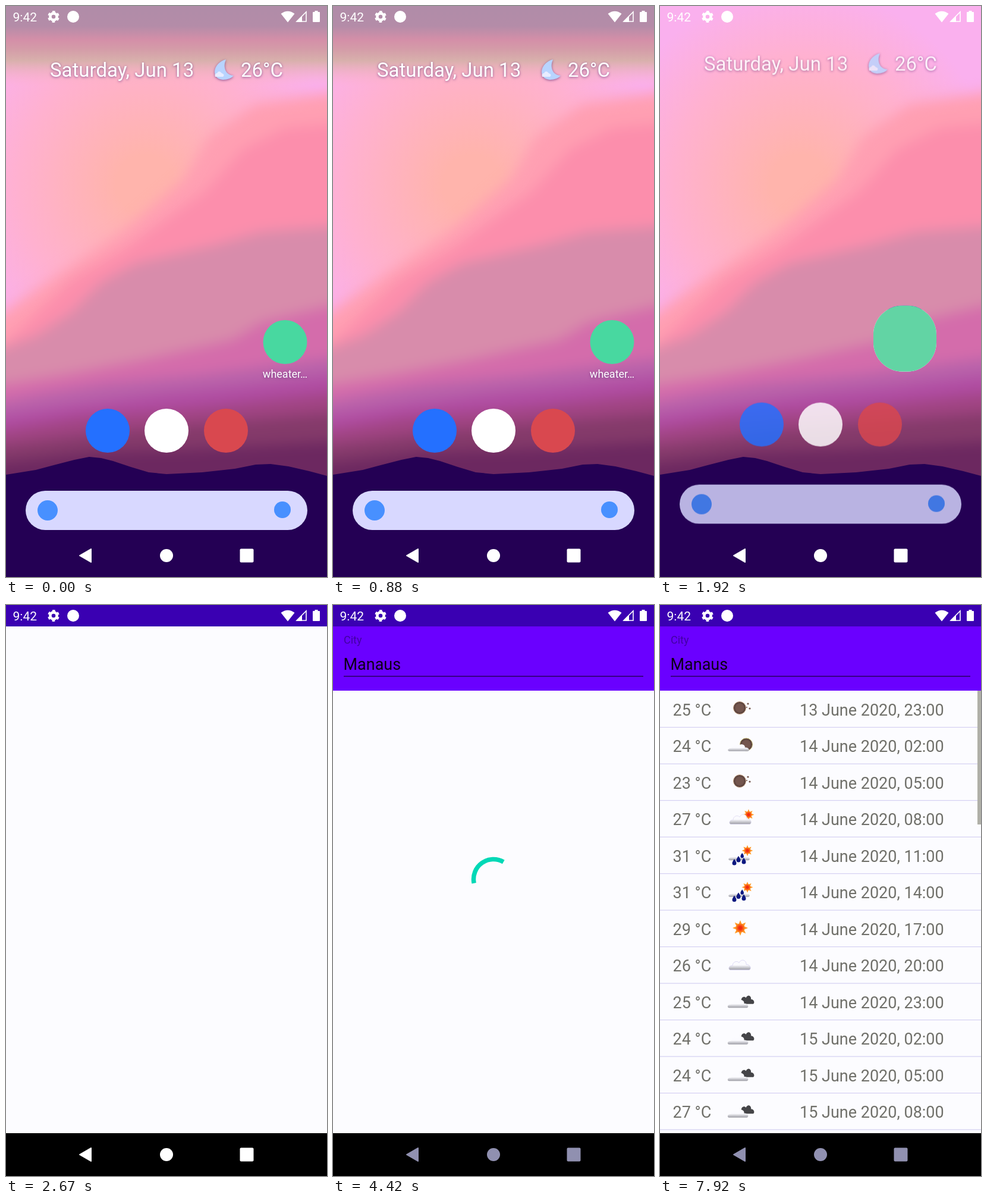
An HTML page for the animation above (8 s loop, 540 px wide and 960 px high).

```html
<!DOCTYPE html>
<html lang="en">
<head>
<meta charset="utf-8">
<title>Weather app launch</title>
<style>
html, body { margin: 0; width: 100%; height: 100%; overflow: hidden; background: #240054; }
svg { display: block; width: 100vw; height: 100vh; }
text { font-family: Roboto, sans-serif; white-space: pre; }
#bands { filter: blur(11px); }
.shadow { filter: drop-shadow(0 1px 2px rgba(110, 60, 130, .8)); }
</style>
</head>
<body>
<svg viewBox="0 0 540 960">
  <defs>
    <radialGradient id="skyFill" gradientUnits="userSpaceOnUse" cx="235" cy="300" r="330">
      <stop offset=".15" stop-color="#ffb4ac"/>
      <stop offset=".65" stop-color="#ffb1d0"/>
      <stop offset="1" stop-color="#fab0ee"/>
    </radialGradient>
    <linearGradient id="scrimFill" x1="0" y1="0" x2="0" y2="1">
      <stop offset="0" stop-color="#b08ca8"/>
      <stop offset=".25" stop-color="#b48ca8"/>
      <stop offset=".42" stop-color="#d48fa8"/>
      <stop offset=".54" stop-color="#d49ca8"/>
      <stop offset=".68" stop-color="#d8b0ac"/>
      <stop offset="1" stop-color="#ffb2c8" stop-opacity="0"/>
    </linearGradient>
    <linearGradient id="cloudFill" x1="0" y1="0" x2="0" y2="1">
      <stop offset=".5" stop-color="#fbfbff"/>
      <stop offset="1" stop-color="#9c9ca4"/>
    </linearGradient>
    <radialGradient id="sunFill">
      <stop offset=".3" stop-color="#f02a10"/>
      <stop offset="1" stop-color="#ff8a20"/>
    </radialGradient>
    <radialGradient id="moonFill">
      <stop offset=".6" stop-color="#74564e"/>
      <stop offset="1" stop-color="#4c3834"/>
    </radialGradient>
    <clipPath id="windowClip"><rect id="windowShape"/></clipPath>

    <path id="cloud" d="M-17 9C-21 8-19 1-13 2C-13-5-5-7-2-3C2-11 11-7 10 0C16-1 20 7 15 9Z"/>
    <g id="sun">
      <path id="rays" fill="#ff9a28"/>
      <circle r="7.5" fill="url(#sunFill)"/>
    </g>
    <g id="stars" fill="#74564e">
      <circle cx="13" cy="-8" r="1.6"/><circle cx="16" cy="0" r="1.6"/><circle cx="11" cy="-2" r="1"/>
    </g>
    <path id="drop" fill="#0c1880" d="M0-5C2-2 3.500 0 3.500 2A3.500 3.500 0 0 1-3.500 2C-3.500 0-2-2 0-5Z"/>

    <g id="night">
      <circle cx="-1" cy="-1" r="10.5" fill="url(#moonFill)" stroke="#c8a488"/>
      <use href="#stars"/>
    </g>
    <g id="nightCloud">
      <circle cx="10" cy="-1" r="10.5" fill="url(#moonFill)" stroke="#b8a868"/>
      <use href="#cloud" transform="translate(-2 4) scale(.98 .7)" fill="url(#cloudFill)"/>
    </g>
    <g id="sunCloud">
      <use href="#sun" transform="translate(14 -6) scale(.72)"/>
      <use href="#cloud" transform="translate(1 1)" fill="url(#cloudFill)" stroke="#d8d4f0" stroke-width=".7"/>
    </g>
    <g id="sunRain">
      <use href="#sun" transform="translate(12 -7) scale(.72)"/>
      <use href="#cloud" transform="translate(-1 3) scale(.98 .7)" fill="url(#cloudFill)"/>
      <use href="#drop" x="-10" y="12"/><use href="#drop" x="-3" y="7"/>
      <use href="#drop" x="6" y="10"/><use href="#drop" x="4" y="1" transform="scale(.8)"/>
    </g>
    <use id="clear" href="#sun"/>
    <use id="cloudy" href="#cloud" fill="url(#cloudFill)" stroke="#d0ccf0" stroke-width=".7"/>
    <g id="overcast">
      <use href="#cloud" transform="translate(11 -3) scale(.72 .85)" fill="#454548"/>
      <use href="#cloud" transform="translate(-3 4) scale(.95 .8)" fill="url(#cloudFill)"/>
    </g>
    <path id="sync" transform="scale(2.25) translate(-12 -11.8)" d="M12 6v3l4-4-4-4v3c-4.42 0-8 3.58-8 8 0 1.57.46 3.03 1.24 4.26L6.7 14.8c-.45-.83-.7-1.79-.7-2.8 0-3.31 2.69-6 6-6zm6.76 1.74L17.3 9.2c.44.84.7 1.79.7 2.8 0 3.31-2.69 6-6 6v-3l-4 4 4 4v-3c4.42 0 8-3.58 8-8 0-1.57-.46-3.03-1.24-4.26z"/>
  </defs>

  <rect width="540" height="960" fill="url(#skyFill)"/>
  <g id="bands">
    <path fill="#ff9fb2" d="M-40 540L60 470L200 375L300 290L340 220L420 165L580 140V960H-40Z"/>
    <path fill="#fc8eac" d="M-40 590L0 565L110 460L200 408L335 312L400 240L470 205L580 195V960H-40Z"/>
    <path fill="#d88cab" d="M-40 588L50 555L110 515L160 465L220 432L350 402L430 380L580 368V960H-40Z"/>
    <path fill="#d46cab" d="M-40 642L100 620L220 597L380 562L430 532L580 495V960H-40Z"/>
    <path fill="#b862aa" d="M-40 672L60 652L160 636L330 620L580 588V960H-40Z"/>
    <path fill="#b04ca2" d="M-40 694L110 672L270 652L400 640L580 618V960H-40Z"/>
    <path fill="#a04482" d="M-40 720L120 692L300 678L580 648V960H-40Z"/>
    <path fill="#843a6a" d="M-40 744L180 716L360 700L580 682V960H-40Z"/>
    <path fill="#6c2860" d="M-40 772L150 750L320 745L580 730V960H-40Z"/>
  </g>
  <path fill="#240054" d="M0 788L50 780L80 772L115 763L140 758L160 760L180 765L210 775L240 784L270 787L330 784L385 778L420 771L445 770L475 774L510 782L540 790V960H0Z"/>
  <rect id="scrim" width="540" height="135" fill="url(#scrimFill)"/>

  <g id="workspace">
    <g class="shadow" fill="#fff" font-size="33">
      <text x="74" y="119">Saturday, Jun 13</text>
      <text x="395" y="119">26°C</text>
      <path fill="#b8d4ff" d="M370 90C360 92 351 101 351 111Q352 123 365 124Q377 124 383 117C370 117 364 103 370 90Z"/>
      <path fill="#e8ecff" d="M352 119Q350 113 355 113Q358 107 363 113Q369 115 365 119Z"/>
    </g>
    <circle cx="171" cy="714" r="37" fill="#2470ff"/>
    <circle cx="270" cy="714" r="37" fill="#fff"/>
    <circle cx="370" cy="714" r="37" fill="#d9484f"/>
    <rect x="33" y="815" width="474" height="66" rx="33" fill="#d8d8ff"/>
    <circle cx="70" cy="848" r="17" fill="#4890ff"/>
    <circle cx="465" cy="847" r="14" fill="#4890ff"/>
    <g id="shortcut">
      <circle cx="469.5" cy="565" r="37" fill="#48d8a0"/>
      <text class="shadow" x="469.5" y="624.500" font-size="18" text-anchor="middle" fill="#fff">wheater…</text>
    </g>
  </g>

  <g id="window" clip-path="url(#windowClip)">
    <g id="screen">
      <rect width="540" height="960" fill="#fcfcff"/>
      <rect width="540" height="36" fill="#3a00b2"/>
      <rect y="888" width="540" height="72"/>
      <g id="header">
        <rect y="36" width="540" height="108" fill="#6a00ff"/>
        <text x="18" y="65" font-size="18" fill="#4200a4">City</text>
        <text x="17.5" y="108.5" font-size="27" fill="#0c0018">Manaus</text>
        <rect x="18" y="119" width="504" height="1.6" fill="#2a0068"/>
      </g>
      <path id="spinner" fill="none" stroke="#00d8b6" stroke-width="7.5"/>
      <g id="list">
        <g id="rows" font-size="27" fill="#70706a"></g>
        <rect id="scrollbar" x="534" y="144" width="6" height="225" fill="#b0b0a8"/>
      </g>
    </g>
    <rect id="splash" width="540" height="960" fill="#62d4a4"/>
  </g>

  <g fill="#fff">
    <text x="11.5" y="26" font-size="21">9:42</text>
    <circle cx="80" cy="18" r="5.6" fill="none" stroke="#fff" stroke-width="4.6"/>
    <circle cx="80" cy="18" r="8.4" fill="none" stroke="#fff" stroke-width="3" stroke-dasharray="4.6 4.196" stroke-dashoffset="-2.1"/>
    <circle cx="113" cy="18" r="10"/>
    <path d="M462.5 13Q474 4.5 485.500 13L474 27.500Z"/>
    <path d="M489 26L505 10V26Z" fill="none" stroke="#fff" stroke-width="1.6"/>
    <path d="M488 27L498 17V27Z"/>
    <path d="M519.500 8H524.500V10H527Q528 10 528 11V26Q528 27 527 27H517Q516 27 516 26V11Q516 10 517 10H519.500Z"/>
  </g>
  <g id="nav">
    <path d="M124 924L143 913V935Z" stroke="currentColor" stroke-width="2" stroke-linejoin="round" fill="currentColor"/>
    <circle cx="270" cy="924" r="11" fill="currentColor"/>
    <rect x="393.500" y="912.500" width="23" height="23" rx="2" fill="currentColor"/>
  </g>
</svg>
<script>
const LOOP = 8000, LAUNCH = 1885, CONTENT = 2858, LIST = 4630, ICONS = 6340;
const $ = id => document.getElementById(id);
const clamp = v => Math.min(1, Math.max(0, v));
const mix = (a, b, p) => a + (b - a) * p;
const ramp = (t, start, length) => clamp((t - start) / length);
const show = (node, on) => { node.style.display = on ? '' : 'none'; };
const setAttrs = (node, attrs) => {
  for (const key in attrs) node.setAttribute(key, attrs[key]);
};

// Cubic bezier easing with control heights 0 and 1
const bezier = (x1, x2) => x => {
  let lo = 0, hi = 1;
  for (let i = 0; i < 24; i++) {
    const s = (lo + hi) / 2;
    const at = 3 * (1 - s) ** 2 * s * x1 + 3 * (1 - s) * s * s * x2 + s ** 3;
    if (at < x) lo = s; else hi = s;
  }
  return lo * lo * (3 - 2 * lo);
};
const launchEase = bezier(.2, 0), arcEase = bezier(.4, .2);

const polar = (r, degrees) => {
  const a = degrees * Math.PI / 180;
  return [r * Math.cos(a), r * Math.sin(a)];
};
$('rays').setAttribute('d', Array.from({ length: 16 }, (_, i) =>
  (i ? 'L' : 'M') + polar(i % 2 ? 7 : 13, i * 22.5 - 90)).join('') + 'Z');

const forecast = [
  [25, 'night'], [24, 'nightCloud'], [23, 'night'], [27, 'sunCloud'],
  [31, 'sunRain'], [31, 'sunRain'], [29, 'clear'], [26, 'cloudy'],
  [25, 'overcast'], [24, 'overcast'], [24, 'overcast'], [27, 'overcast']
];
$('rows').innerHTML = forecast.map(([temp, icon], i) => {
  const hours = 23 + 3 * i, y = 61.5 * i;
  const day = 13 + Math.floor(hours / 24);
  const hour = String(hours % 24).padStart(2, '0');
  return `<g transform="translate(0 ${y})">
    <text x="21.500" y="185.500">${temp} °C</text>
    <text x="235" y="185.500">${day} June 2020, ${hour}:00</text>
    <use class="waiting" href="#sync" x="135" y="174" fill="#000"/>
    <use class="loaded" href="#${icon}" x="135" y="174"/>
    <rect y="205" width="540" height="1.2" fill="#d4d0f2"/></g>`;
}).join('');
const waiting = document.querySelectorAll('.waiting');
const loaded = document.querySelectorAll('.loaded');
const loadTime = i => i < 6 ? ICONS + 32 * i : 6560 + 72 * (i - 6);

function drawLaunch(t) {
  const p = launchEase(ramp(t, LAUNCH, 500));
  const px = launchEase(ramp(t, LAUNCH, 270));
  const w = mix(74, 540, p), h = mix(74, 960, p ** 1.185);
  const x = mix(469.5, 270, px) - w / 2, y = mix(565, 480, p) - h / 2;
  const box = { x, y, width: w, height: h };
  setAttrs($('windowShape'), { ...box, rx: Math.min(52, w / 2 * (1 - p)) });
  setAttrs($('splash'), { ...box, opacity: 1 - ramp(t, LAUNCH + 40, 50) });
  setAttrs($('screen'), { transform: `translate(${x} ${y}) scale(${w / 540})` });
  setAttrs($('workspace'), {
    transform: `translate(0 ${-36 * px})`,
    opacity: 1 - ramp(t, LAUNCH, 217)
  });
  setAttrs($('scrim'), { opacity: 1 - ramp(t, LAUNCH, 35) });
  show($('window'), t >= LAUNCH);
  show($('shortcut'), t < LAUNCH);
}

function drawSpinner(t) {
  const age = Math.max(0, t - CONTENT), u = age / 1333 % 1;
  const head = 270 * arcEase(clamp(2 * u));
  const tail = 270 * arcEase(clamp(2 * u - 1));
  const turn = -16 + age * 720 / 6665 + 90 * u;
  const [x1, y1] = polar(33.5, turn + tail);
  const [x2, y2] = polar(33.5, turn + Math.max(head, tail + 2));
  const large = head - tail > 180 ? 1 : 0;
  $('spinner').setAttribute('d',
    `M${270 + x1} ${461 + y1}A33.5 33.5 0 ${large} 1 ${270 + x2} ${461 + y2}`);
  show($('spinner'), t >= CONTENT && t < LIST);
}

function draw(t) {
  drawLaunch(t);
  drawSpinner(t);
  show($('header'), t >= CONTENT);
  show($('list'), t >= LIST);
  forecast.forEach((_, i) => {
    const ready = t >= loadTime(i);
    show(waiting[i], !ready);
    show(loaded[i], ready);
  });
  setAttrs($('scrollbar'), { opacity: t < ICONS ? 1 - ramp(t, 5880, 250) : 1 });
  const dim = ramp(t, 3200, 500);
  $('nav').style.color = `rgb(${mix(255, 144, dim)}, ${mix(255, 144, dim)}, ${mix(255, 176, dim)})`;
}

const began = performance.now();
function tick() {
  draw((performance.now() - began) % LOOP);
  requestAnimationFrame(tick);
}
tick();
</script>
</body>
</html>
```
